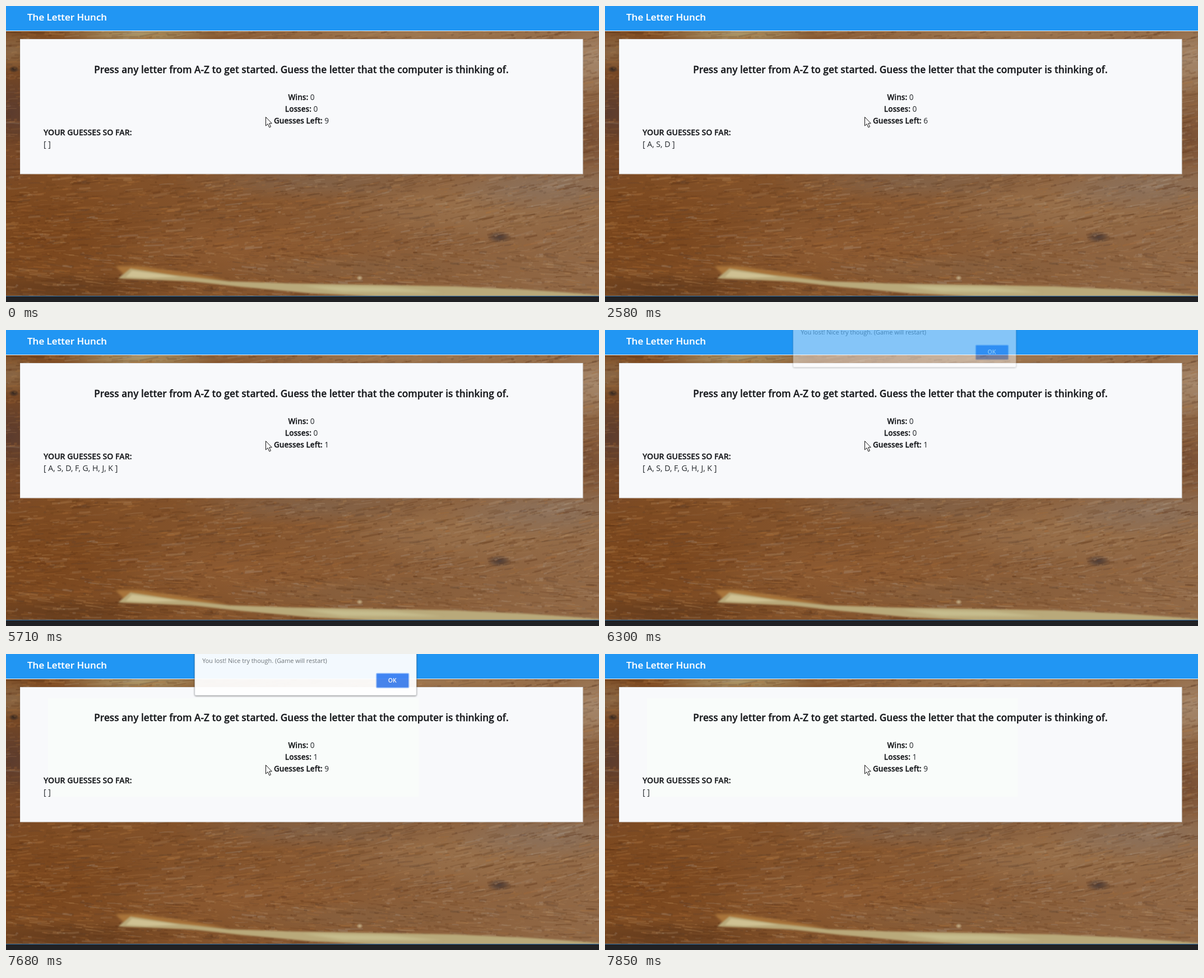
Animation of 1058 by 529 pixels, one loop 8 s. Source, as an HTML page with a canvas:

```html
<!DOCTYPE html>
<html lang="en">
<head>
<meta charset="utf-8">
<title>The Letter Hunch</title>
<style>
  html, body { margin: 0; width: 100%; height: 100%; overflow: hidden; background: #80502a; }
  canvas, svg { position: absolute; left: 0; top: 0; width: 1058px; height: 529px; }
  text { font: 400 13.6px "Open Sans", "Noto Sans", sans-serif; fill: #212529; }
  .strong { font-weight: 600; fill: #17191c; stroke: #17191c; stroke-width: .3px; }
  .mid { text-anchor: middle; }
  .title { font-size: 17px; font-weight: 600; fill: #fff; stroke: #fff; stroke-width: .2px; }
  .lead { font-size: 17.3px; }
  .caps { font-size: 14.1px; }
  .list { font-size: 14.1px; }
  .note { font-size: 10.9px; fill: #737373; }
  .ok { font-size: 10.5px; font-weight: 600; fill: #fff; }
</style>
</head>
<body>
<canvas id="wood" width="1058" height="529"></canvas>
<svg viewBox="0 0 1058 529">
  <defs>
    <filter id="shadow" x="-5%" y="-20%" width="110%" height="150%">
      <feDropShadow dx="0" dy="1" stdDeviation="1.5" flood-opacity=".5"/>
    </filter>
  </defs>

  <rect width="1058" height="44" fill="#2196f3"/>
  <rect y="44" width="1058" height="1" fill="#f1f3f3"/>
  <text class="title" x="38" y="26">The Letter Hunch</text>

  <rect x="25" y="59" width="1004.5" height="241.5" fill="#f8f9fb"/>
  <rect x="25" y="59.5" width="1004" height="240.5" fill="none" stroke="#000" stroke-opacity=".1"/>
  <rect id="tint" x="75" y="79" width="661" height="176" fill="#f9fcfa" visibility="hidden"/>
  <text class="strong lead mid" x="527" y="120">Press any letter from A-Z to get started. Guess the letter that the computer is thinking of.</text>
  <text class="mid" x="527" y="168"><tspan class="strong">Wins:</tspan> 0</text>
  <text class="mid" x="527" y="189"><tspan class="strong">Losses:</tspan> <tspan id="losses">0</tspan></text>
  <text class="mid" x="527" y="210"><tspan class="strong">Guesses Left:</tspan> <tspan id="left">9</tspan></text>
  <text class="strong caps" x="67" y="231">YOUR GUESSES SO FAR:</text>
  <text class="list" id="guesses" x="67" y="252">[ ]</text>

  <rect y="518" width="1058" height="1" fill="#3b78ac"/>
  <rect y="519" width="1058" height="10" fill="#202124"/>

  <g id="dialog" opacity="0">
    <rect x="337" y="-10" width="395" height="86" rx="2" fill="#fff" stroke="#8d9299" stroke-opacity=".6" stroke-width=".6" filter="url(#shadow)"/>
    <text class="note" x="350.5" y="18">You lost! Nice try though. (Game will restart)</text>
    <rect x="660.5" y="36.5" width="58" height="26" rx="2" fill="#4285f4" stroke="#a9c9fb" stroke-width="1.6"/>
    <text class="ok mid" x="689" y="53">OK</text>
  </g>

  <path d="M463.5 198.5v15.6l3.6-3.4 2.7 6.2 2.6-1.1-2.7-6h4.6z" fill="#fff" stroke="#111" stroke-width="1"/>
</svg>

<script>
const $ = id => document.getElementById(id);
const LOOP = 8000, RESET = 7680;
const keys = [..."ASDFGHJK"];
const keyTimes = [900, 1960, 2580, 3170, 3730, 4660, 5180, 5710];
// time, opacity, vertical offset
const dialogSteps = [
  [0, 0, -14],
  [6270, .15, -13], [6300, .45, -9.5], [6350, .8, -4], [6380, .95, -1], [6410, 1, 0],
  [7680, .95, -2], [7710, .8, -5], [7740, .58, -9.5], [7770, .27, -12], [7850, 0, -14]
];

function paintWood() {
  const c = $("wood").getContext("2d");
  let seed = 41;
  const rnd = () => (seed = (seed * 16807) % 2147483647) / 2147483647;
  const spread = n => (rnd() - .5) * 2 * n;

  function blob(x, y, rx, ry, color) {
    c.save();
    c.translate(x, y);
    c.scale(rx, ry);
    const g = c.createRadialGradient(0, 0, 0, 0, 0, 1);
    g.addColorStop(0, color);
    g.addColorStop(.4, color + "b0");
    g.addColorStop(1, color + "00");
    c.fillStyle = g;
    c.fillRect(-1, -1, 2, 2);
    c.restore();
  }

  const base = c.createLinearGradient(0, 0, 1058, 0);
  base.addColorStop(0, "#7d4a21");
  base.addColorStop(.45, "#86562f");
  base.addColorStop(1, "#916947");
  c.fillStyle = base;
  c.fillRect(0, 0, 1058, 529);
  [
    [60, 410, 220, 100, "#7a461d"],
    [10, 190, 70, 90, "#5c3c2e"],
    [10, 80, 60, 40, "#8a6745"],
    [10, 280, 70, 50, "#774828"],
    [1045, 95, 70, 60, "#a5876b"],
    [1045, 235, 60, 80, "#7a5034"],
    [240, 50, 150, 20, "#ab9566"],
    [720, 50, 400, 18, "#9e7750"],
    [560, 315, 260, 35, "#836247"],
    [830, 360, 260, 60, "#98704b"],
    [960, 325, 180, 45, "#8b705a"],
    [420, 430, 240, 55, "#8d5a31"],
    [100, 505, 230, 30, "#673d1d"],
    [640, 470, 260, 30, "#875f3d"],
    [880, 413, 22, 11, "#4e3f3a"],
    [14, 113, 9, 6, "#2c211c"]
  ].forEach(b => blob(...b));

  // fine mottled grain, greyer and lighter towards the right
  const darks = ["#542c12", "#633a1c", "#5b4030"];
  const warm = ["#b0753c", "#a86a33", "#b98a58"];
  const pale = ["#b59a7c", "#ad8a68", "#a8988a"];
  for (let i = 0; i < 9000; i++) {
    const x = rnd() * 1058, y = 40 + rnd() * 480;
    const light = rnd() < .15 + .6 * x / 1058 ? pale : warm;
    const tones = rnd() < .46 ? darks : light;
    const length = 3 + rnd() * rnd() * 45;
    const slope = (y > 440 ? .06 : -.04 - .18 * x / 1058) + spread(.1);
    c.globalAlpha = .06 + rnd() * .22;
    c.strokeStyle = tones[Math.floor(rnd() * tones.length)];
    c.lineWidth = 1 + rnd() * 3;
    c.beginPath();
    c.moveTo(x - length / 2, y - slope * length / 2);
    c.quadraticCurveTo(x, y + spread(2), x + length / 2, y + slope * length / 2);
    c.stroke();
  }
  c.globalAlpha = 1;

  // pale split along the lower edge
  const shape = (d, color, blur) => {
    c.filter = `blur(${blur}px)`;
    c.fillStyle = color;
    c.fill(new Path2D(d));
  };
  shape("M195 465L235 464 320 477 395 489 300 489 210 480Z", "#a8743a", 2);
  shape("M222 469L300 481 400 492 520 496 640 498 800 501 930 507 1058 516V519H660L540 513 420 502 330 492 200 487Z", "#b9a97a", 1.5);
  shape("M225 473L310 484 250 486 214 484Z", "#cfc193", 1.5);
  shape("M530 500L690 503 780 512 600 511Z", "#c6bd8e", 2);
  c.filter = "none";
  blob(631, 486, 6, 5, "#c4ae86");
}

function render(now) {
  const t = (now - start + LOOP) % LOOP;
  const over = t >= RESET;
  const count = over ? 0 : keyTimes.filter(k => t >= k).length;
  const state = `${count}-${over}`;
  if (state !== shown) {
    shown = state;
    $("losses").textContent = over ? 1 : 0;
    $("left").textContent = 9 - count;
    $("guesses").textContent = count ? `[ ${keys.slice(0, count).join(", ")} ]` : "[ ]";
    $("tint").setAttribute("visibility", over ? "visible" : "hidden");
  }
  const [, opacity, dy] = dialogSteps.findLast(s => t >= s[0]);
  const scale = 1 - dy * .0007;
  $("dialog").setAttribute("opacity", opacity);
  $("dialog").setAttribute("transform", `translate(${534.5 * (1 - scale)} ${dy}) scale(${scale} 1)`);
  requestAnimationFrame(render);
}

let shown = "";
paintWood();
const start = performance.now();
render(start);
</script>
</body>
</html>
```
